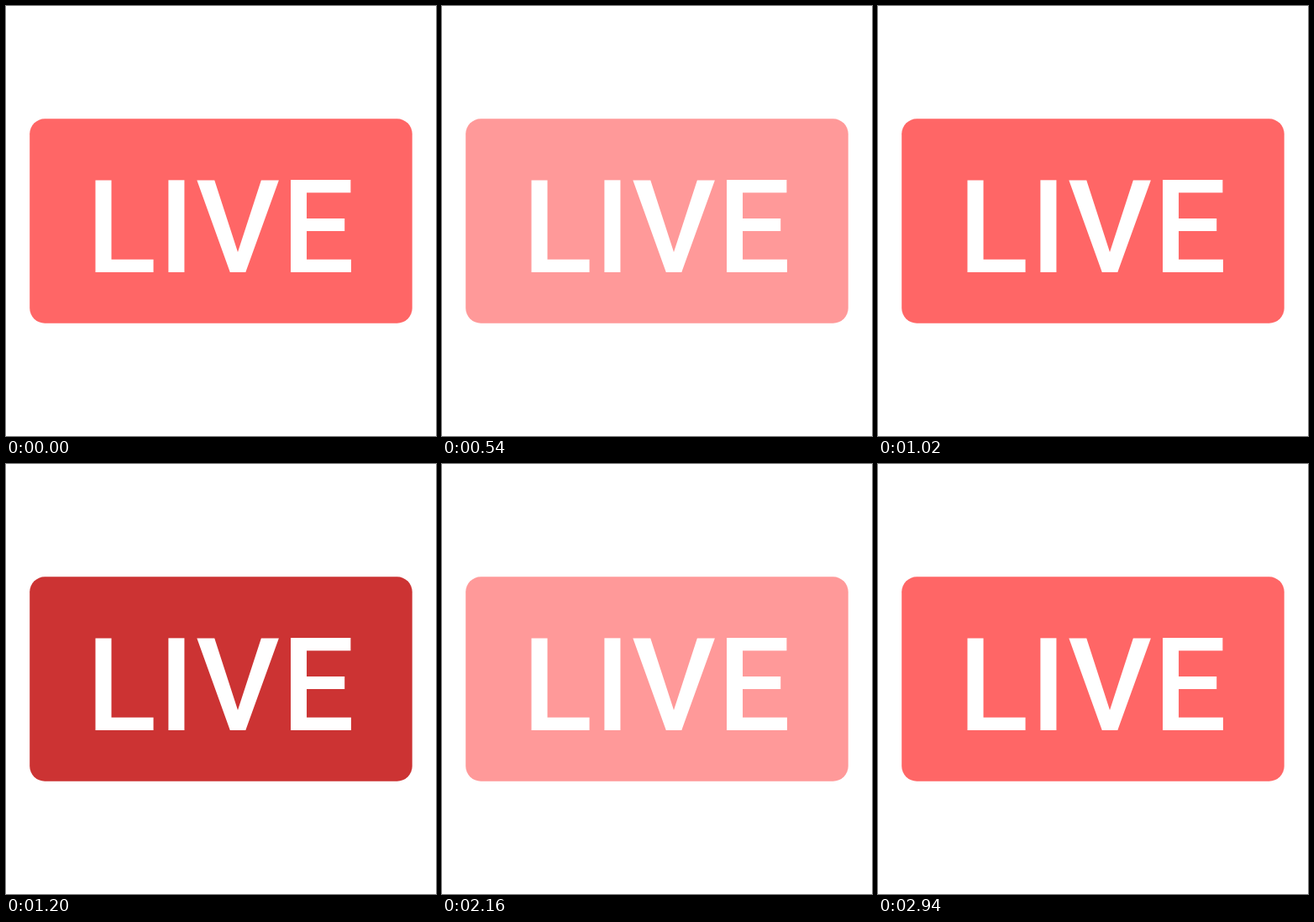
An HTML page that plays this animation: 512 px wide and 512 px high, repeating every 3.24 s.

```html
<!DOCTYPE html>
<html lang="en">
<head>
<meta charset="utf-8">
<title>Live badge</title>
<style>
  html, body { margin: 0; width: 100%; height: 100%; overflow: hidden; background: #fff; }
  svg { display: block; width: 100%; height: 100%; }
  text { font: 500 154.7px Roboto, Arial, sans-serif; fill: #fff; }
</style>
</head>
<body>
<svg viewBox="0 0 512 512">
  <rect id="badge" x="28.2" y="134.3" width="455.5" height="243.4" rx="18"/>
  <text id="label" y="317">LIVE</text>
</svg>
<script>
const LOOP = 3240, LAST_STEP = 2940, STEP = 30;
const PERIOD = 1920, FADE_START = -120, FADE_END = 1200;
const badge = document.getElementById('badge');
const label = document.getElementById('label');

// Place each letter by the left edge of its ink.
function placeLetters(edges) {
  const pen = document.createElement('canvas').getContext('2d');
  pen.font = '500 154.7px Roboto, Arial, sans-serif';
  const starts = edges.map((edge, i) =>
    edge + pen.measureText(label.textContent[i]).actualBoundingBoxLeft);
  label.setAttribute('x', starts.join(' '));
}

// The fading red is posterized to three flat tones.
function toneAt(time) {
  const held = Math.min(Math.floor(time / STEP) * STEP, LAST_STEP);
  const t = held < FADE_START + PERIOD ? held : held - PERIOD;
  const depth = Math.min(t - FADE_START, FADE_END - t);
  if (depth < 45) return '#cc3333';
  return depth < 285 ? '#ff6666' : '#ff9999';
}

function render(time) {
  badge.setAttribute('fill', toneAt(time % LOOP));
}

function tick() {
  render(performance.now() - start);
  requestAnimationFrame(tick);
}

placeLetters([106.3, 193, 227, 338.8]);
const start = performance.now();
tick();
</script>
</body>
</html>
```
